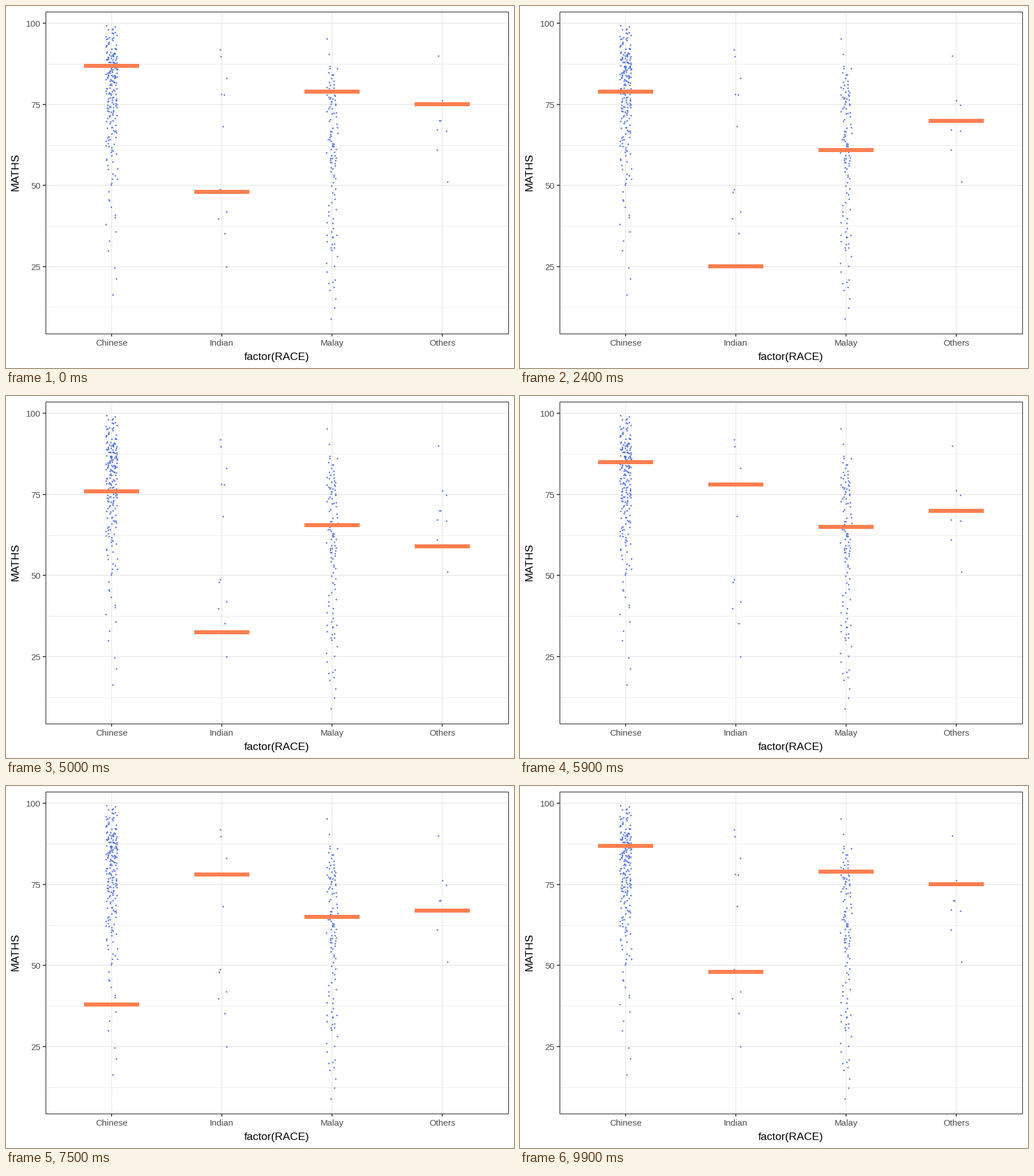
Write a matplotlib script that moves like this. It is 885 by 632 pixels and loops after 10000 ms.

```python
import numpy as np
import matplotlib.pyplot as plt
from matplotlib.animation import FuncAnimation
from matplotlib.patches import Rectangle

W, H, DPI = 885, 632, 100
PT = 72 / DPI  # points per pixel
LEFT, RIGHT, TOP, BOTTOM = 69, 875, 9.5, 571.5
CENTRES = 183.9 + 191.93 * np.arange(4)
GROUPS = ["Chinese", "Indian", "Malay", "Others"]
BAR_W, BAR_H = 96, 7
FRAMES, INTERVAL = 100, 100
GRID, DARK, GREY = "#EBEBEB", "#333333", "#4D4D4D"
plt.rcParams["font.family"] = ["Liberation Sans", "DejaVu Sans"]


def to_y(score):
    return 30.45 + 5.66 * (100 - np.asarray(score, float))


# One sampled score per group for each state
STATES = np.array([
    (87, 48, 79, 75), (74, 48, 64, 70), (72, 78, 58, 61), (21, 68, 54, 67),
    (58, 35, 52, 51), (83, 48, 66, 51), (79, 25, 61, 70), (79, 92, 75, 61),
    (75, 35, 34, 70), (85, 25, 75, 51), (91, 49, 70, 51), (74, 68, 45, 70),
    (79, 40, 66, 67), (73, 25, 65, 51), (89, 83, 75, 61), (85, 78, 65, 70),
    (87, 48, 47, 75), (74, 68, 32, 67), (95, 42, 79, 75), (38, 78, 65, 67),
    (91, 49, 75, 70), (80, 83, 11, 61), (97, 78, 58, 70), (77, 90, 32, 67),
    (79, 68, 63, 70),
])

rng = np.random.default_rng(7)


def ranked(ranks, scores):
    """Whole scores along a rank curve, jittered around their group."""
    count = ranks[-1] + 1
    level = np.interp(np.arange(count), ranks, scores).round()
    return (rng.uniform(-10, 10, count),
            level + rng.uniform(-0.4, 0.4, count))


# Pixel offsets from the group's centre, and scores
points = [
    ranked([0, 3, 5, 13, 26, 44, 58, 90, 108, 137, 178, 200, 206],
           [16, 30, 36, 50, 60, 67, 72, 78, 82, 86, 91, 97, 99]),
    ([-3, -2, 8, -1, 4, 2, -3, -5, 8, -6, 5, 8],
     [91.9, 89.8, 83.1, 78.2, 78, 68.2, 48.8, 47.9, 41.9, 39.9, 35.3, 25]),
    ranked([0, 3, 7, 12, 22, 36, 43, 53, 72, 81, 106, 115, 117],
           [9, 18, 21, 30, 36, 50, 56, 59, 67, 73, 81, 87, 95]),
    ([-7, 0, 7, -5, -3, -9, 7, -9, 9],
     [90, 76.3, 74.8, 70, 70, 67.2, 66.8, 61, 51.2]),
]

fig = plt.figure(figsize=(W / DPI, H / DPI), dpi=DPI, facecolor="white")
ax = fig.add_axes([0, 0, 1, 1])
ax.set(xlim=(0, W), ylim=(H, 0))
ax.axis("off")


def line(xs, ys, color, width=1.6):
    ax.plot(xs, ys, color=color, lw=width * PT, zorder=1,
            solid_capstyle="butt")


def label(x, y, text, px, color, **kw):
    kw = {"ha": "center", "va": "baseline", **kw}
    ax.text(x, y, text, fontsize=px * PT, color=color, **kw)


for score in np.arange(12.5, 100, 25):
    line([LEFT, RIGHT], [to_y(score)] * 2, GRID, 1)
for score in range(25, 101, 25):
    y = to_y(score)
    line([LEFT, RIGHT], [y, y], GRID)
    line([LEFT - 5, LEFT], [y, y], DARK)
    label(60, y + 5.8, str(score), 15.28, GREY, ha="right")
for x, name in zip(CENTRES, GROUPS):
    line([x, x], [TOP, BOTTOM], GRID)
    line([x, x], [BOTTOM, BOTTOM + 5], DARK)
    label(x, 592.6, name, 15.28, GREY)
label((LEFT + RIGHT) / 2, 618, "factor(RACE)", 19.1, "black")
label(25.3, (TOP + BOTTOM) / 2, "MATHS", 19.1, "black", rotation=90,
      ha="right", va="center")

for x, (offsets, scores) in zip(CENTRES, points):
    ax.scatter(x + np.asarray(offsets), to_y(scores), s=(2.8 * PT) ** 2,
               color="royalblue", alpha=0.85, linewidths=0, zorder=2)

bars = [ax.add_patch(Rectangle((x - BAR_W / 2, 0), BAR_W, BAR_H,
                               fc="coral", ec="none", zorder=3))
        for x in CENTRES]
ax.add_patch(Rectangle((LEFT, TOP), RIGHT - LEFT, BOTTOM - TOP, fill=False,
                       ec=DARK, lw=1.2 * PT, zorder=4))


def update(frame):
    # Three held frames, then one halfway; a single hold is one frame short
    step = frame if frame < 49 else frame + 1
    state, phase = divmod(step, 4)
    now = STATES[state % len(STATES)]
    following = STATES[(state + 1) % len(STATES)]
    scores = (now + following) / 2 if phase == 3 else now
    for bar, y in zip(bars, to_y(scores)):
        bar.set_y(y - BAR_H / 2)
    return bars


anim = FuncAnimation(fig, update, frames=FRAMES, interval=INTERVAL,
                     repeat=True, repeat_delay=0, blit=False)
plt.show()
```
